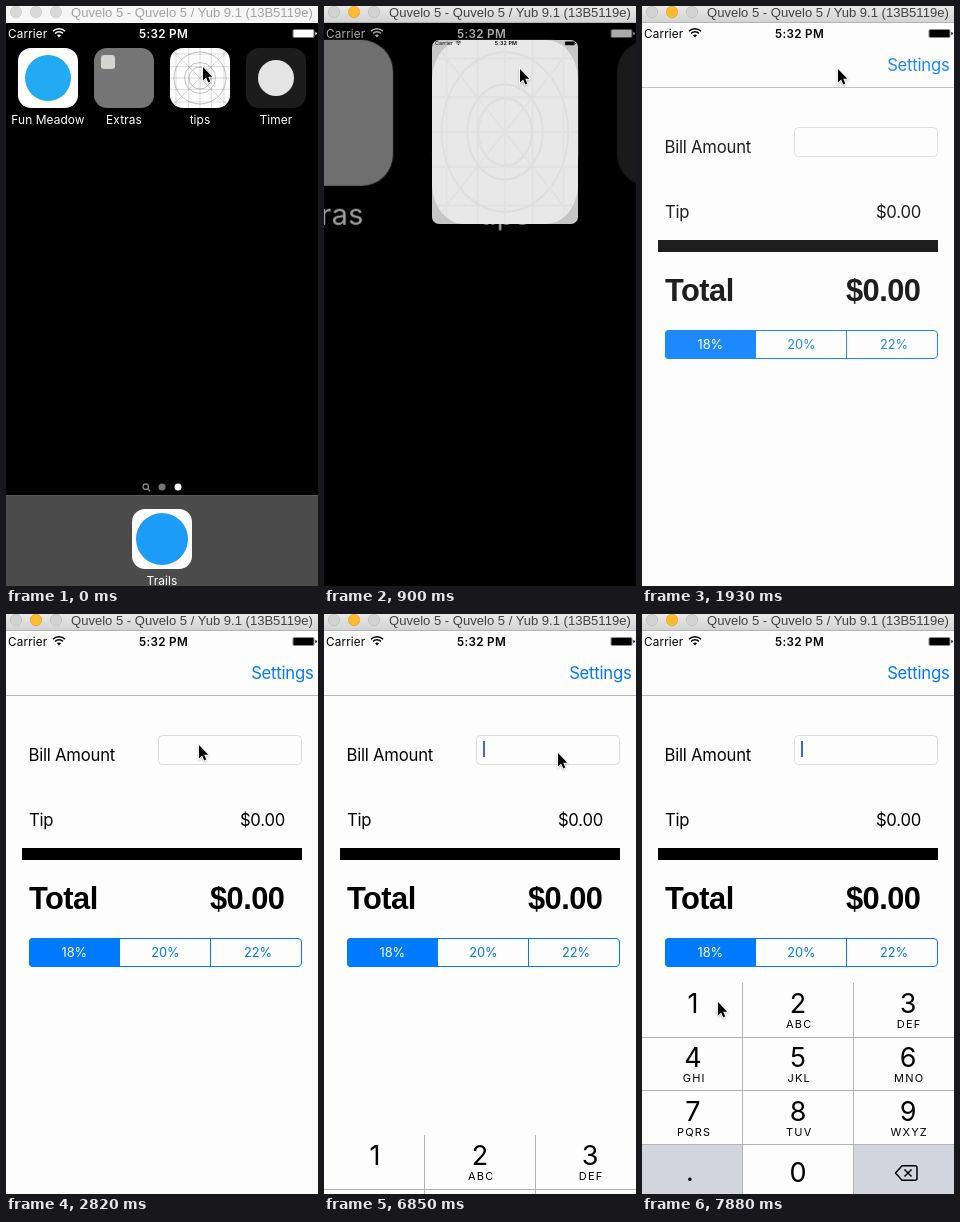
Recreate the animation shown at these times as an HTML page. Size 312 by 580 pixels, loop 8 s.

```html
<!DOCTYPE html>
<html lang="en">
<head>
<meta charset="utf-8">
<title>Tip calculator</title>
<style>
html, body { margin: 0; width: 100%; height: 100%; overflow: hidden; background: #000; }
svg { display: block; }
#stage { width: 312px; height: 580px; font-family: Inter, Roboto, sans-serif; }
.mid { text-anchor: middle; }
.end { text-anchor: end; }
.label { font-size: 11.9px; letter-spacing: .1px; fill: #fff; text-anchor: middle; }
.body { font-size: 16.7px; letter-spacing: -.23px; }
.big { font: bold 30.8px "Liberation Sans", Arial, sans-serif; letter-spacing: -.5px; }
.seg { font-size: 12.8px; letter-spacing: -.05px; text-anchor: middle; }
.digit { font-size: 27px; text-anchor: middle; }
.letters { font-size: 11px; letter-spacing: 1.2px; text-anchor: middle; }
.title { font: 13.05px "Liberation Sans", Arial, sans-serif; }

/* every change is a hard step on one 8 s clock */
.a { animation: 8s step-end infinite; }
#active { animation-name: active; }
#press { animation-name: press; }
#home { animation-name: home; }
#labels { animation-name: labels; }
#homeBar { animation-name: homeBar; }
#app { animation-name: app; }
#appBar { animation-name: appBar; }
#splash { animation-name: splash; }
#content { animation-name: content; }
#caret { animation-name: caret; }
#keys { animation-name: keys; }
#cursor { animation-name: cursor; }

@keyframes active { 0% { opacity: 0 } 7.5%, 100% { opacity: 1 } }
@keyframes press { 0% { opacity: 0 } 7.5%, 100% { opacity: .5 } }
@keyframes home {
  0% { transform: none; opacity: 1 }
  11.25% { transform: translate(-291px, -68.2px) scale(2.433); opacity: .96 }
  13.125%, 100% { transform: none; opacity: 0 }
}
@keyframes labels { 0% { opacity: 1 } 11.25%, 100% { opacity: .67 } }
@keyframes homeBar {
  0% { opacity: 1 } 11.25% { opacity: .67 } 13.125% { opacity: .13 } 15%, 100% { opacity: 0 }
}
@keyframes app {
  0% { opacity: 0; x: 108px; y: 34px; width: 146px; height: 184px; rx: 7px; fill: #c6c6c6 }
  11.25% { opacity: 1; x: 108px; y: 34px; width: 146px; height: 184px; rx: 7px; fill: #c6c6c6 }
  13.125% { opacity: 1; x: 11.5px; y: 19px; width: 296.5px; height: 505px; rx: 1px; fill: #fefefe }
  15%, 100% { opacity: 1; x: 0px; y: 17px; width: 312px; height: 563px; rx: 0px; fill: #fdfdfd }
}
@keyframes appBar {
  0% { opacity: 0; transform: none }
  11.25% { opacity: 1; transform: translate(110.2px, 32.6px) scale(.456) }
  13.125% { opacity: 1; transform: translate(15.2px, 19.2px) scale(.925) }
  15% { opacity: 1; transform: translate(4px, 17.3px) scale(.975) }
  16.75%, 100% { opacity: 1; transform: translate(0, 17px) }
}
@keyframes splash { 0% { opacity: 0 } 11.25% { opacity: 1 } 13.125%, 100% { opacity: 0 } }
@keyframes content { 0% { opacity: 0 } 24.125% { opacity: .88 } 25.875%, 100% { opacity: 1 } }
@keyframes caret {
  0% { opacity: 0 } 85.625% { opacity: 1 } 93% { opacity: .5 } 94.75% { opacity: 0 } 98.5%, 100% { opacity: 1 }
}
@keyframes keys {
  0% { transform: translateY(600px) }
  85.625% { transform: translateY(521px) }
  87.5% { transform: translateY(405px) }
  89.25% { transform: translateY(371px) }
  91.125%, 100% { transform: translateY(369px) }
}
@keyframes cursor {
  0% { transform: translate(196px, 60px) }
  1.875% { transform: translate(195px, 62px) }
  31.5% { transform: translate(194px, 72px) }
  33.375% { transform: translate(193px, 110px) }
  35.25% { transform: translate(192px, 130px) }
  37.125% { transform: translate(192px, 135px) }
  50.125% { transform: translate(204px, 136px) }
  52% { transform: translate(230px, 136px) }
  53.875% { transform: translate(233px, 138px) }
  93% { transform: translate(233px, 139px) }
  94.75%, 100% { transform: translate(75px, 387px) }
}
</style>
</head>
<body>
<svg id="stage" viewBox="0 0 312 580" xmlns="http://www.w3.org/2000/svg">
  <defs>
    <linearGradient id="chrome" x2="0" y2="1">
      <stop offset="0" stop-color="#e9e9e9"/><stop offset="1" stop-color="#d2d2d2"/>
    </linearGradient>
    <symbol id="status" viewBox="0 0 312 20" overflow="visible">
      <g fill="currentColor">
        <text x="2" y="14.5" font-size="11.7" letter-spacing=".15">Carrier</text>
        <text x="157.5" y="14.5" class="mid" font-size="11.7" font-weight="600" letter-spacing=".3">5:32 PM</text>
        <path d="M53 14.5l-2-2.2a3 3 0 0 1 4 0z"/>
        <g fill="none" stroke="currentColor" stroke-width="1.5">
          <path d="M49.1 10.4a5.6 5.6 0 0 1 7.8 0M47 8.1a8.6 8.6 0 0 1 12 0"/>
        </g>
        <rect x="286.5" y="6" width="22" height="9" rx="1.8" opacity=".45"/>
        <rect x="287.5" y="7" width="20" height="7" rx=".8"/>
        <path d="M309.300 8.900q1.500.2 1.500 1.600t-1.500 1.600z"/>
      </g>
    </symbol>
    <symbol id="grid" viewBox="0 0 60 60" preserveAspectRatio="none">
      <clipPath id="tile"><rect width="60" height="60" rx="13"/></clipPath>
      <g clip-path="url(#tile)">
        <rect width="60" height="60" fill="var(--paper)"/>
        <g fill="none" stroke="currentColor" stroke-width="var(--line)">
          <path opacity=".6" d="M0 6H60M0 18.7H60M0 30H60M0 41.3H60M0 54H60M6 0V60M18.7 0V60M30 0V60M41.3 0V60M54 0V60M0 0L60 60M60 0L0 60"/>
          <circle cx="30" cy="30" r="26"/><circle cx="30" cy="30" r="15.5"/><circle cx="30" cy="30" r="11"/>
        </g>
      </g>
    </symbol>
  </defs>

  <rect width="312" height="580"/>

  <g id="home" class="a">
    <rect x="12" y="42" width="60" height="60" rx="13" fill="#fff"/>
    <circle cx="42" cy="72" r="23" fill="#22aaf2"/>
    <rect x="88" y="42" width="60" height="60" rx="13" fill="#757575"/>
    <rect x="95" y="49" width="14" height="14" rx="3" fill="#d3d3d0"/>
    <use href="#grid" x="164" y="42" width="60" height="60" style="--paper:#fff;--line:.5px;color:#858585"/>
    <rect id="press" class="a" x="164" y="42" width="60" height="60" rx="13" opacity="0"/>
    <rect x="240" y="42" width="60" height="60" rx="13" fill="#1c1c1c"/>
    <circle cx="270" cy="72" r="18" fill="#e4e4e4"/>
    <g id="labels" class="a">
      <text class="label" x="42" y="118">Fun Meadow</text>
      <text class="label" x="118" y="118">Extras</text>
      <text class="label" x="194" y="118">tips</text>
      <text class="label" x="270" y="118">Timer</text>
    </g>
    <g fill="none" stroke="#858585" stroke-width="1.3">
      <circle cx="139.7" cy="480.7" r="2.7"/><path d="M141.7 482.7l2.5 2.5"/>
    </g>
    <circle cx="156" cy="481" r="3.5" fill="#777"/>
    <circle cx="172" cy="481" r="3.5" fill="#fff"/>
    <rect y="489" width="312" height="91" fill="#4b4b4b"/>
    <rect y="489" width="312" height="1" fill="#595959"/>
    <rect x="126" y="503" width="60" height="60" rx="13" fill="#fff"/>
    <circle cx="156" cy="533" r="26" fill="#1c9cf6"/>
    <text class="label" x="156" y="579">Trails</text>
  </g>
  <g id="homeBar" class="a" color="#fff"><use href="#status" y="17" width="312" height="20"/></g>

  <rect id="app" class="a" opacity="0"/>
  <g id="splash" class="a" opacity="0">
    <use href="#grid" x="108" y="34" width="146" height="184" style="--paper:#e8e8e8;--line:.8px;color:#dedede"/>
  </g>
  <g id="appBar" class="a" color="#000" opacity="0"><use href="#status" width="312" height="20"/></g>

  <g id="content" class="a" opacity="0">
    <rect y="81" width="312" height="1" fill="#b9b9b9"/>
    <text class="body end" x="307.6" y="65.400" fill="#007aff">Settings</text>
    <text class="body" x="22.5" y="147">Bill Amount</text>
    <rect x="152.5" y="121.5" width="143" height="29" rx="4" fill="#fdfdfd" stroke="#dcdcdc"/>
    <text class="body" x="23" y="212">Tip</text>
    <text class="body end" x="279" y="212">$0.00</text>
    <rect x="16" y="234" width="280" height="12"/>
    <text class="big" x="23" y="295">Total</text>
    <text class="big end" x="278.500" y="295">$0.00</text>
    <rect x="23.5" y="324.5" width="272" height="28" rx="3.500" fill="none" stroke="#007aff"/>
    <path d="M114 324H27a4 4 0 0 0-4 4V349a4 4 0 0 0 4 4H114z" fill="#007aff"/>
    <path d="M204.5 324V353" stroke="#007aff"/>
    <text class="seg" x="68.3" y="343" fill="#fff">18%</text>
    <text class="seg" x="159.3" y="343" fill="#007aff">20%</text>
    <text class="seg" x="252" y="343" fill="#007aff">22%</text>
  </g>
  <rect id="caret" class="a" x="159" y="127" width="2" height="16" fill="#3f68e6" opacity="0"/>

  <g id="keys" class="a" transform="translate(0 600)">
    <rect width="312" height="220" fill="#fdfdfd"/>
    <path d="M0 162H100V220H0zM212 162H312V220H212z" fill="#d2d5dc"/>
    <path d="M0 54.5H312M0 107.5H312M0 161.5H312M100.5 0V220M211.5 0V220" stroke="#b4b4b6" fill="none"/>
    <g id="pad"></g>
    <g fill="none" stroke="#000" stroke-width="1.5" stroke-linejoin="round">
      <path d="M253.5 190l6.5-7.2H273q2 0 2 2V195.2q0 2-2 2H260z"/>
      <path d="M262.5 186.5l7 7m0-7l-7 7"/>
    </g>
  </g>

  <rect width="312" height="17" fill="#f6f6f6"/>
  <g fill="#d9d9d9" stroke="#cdcdcd" stroke-width=".8">
    <circle cx="10" cy="6" r="5.7"/><circle cx="30" cy="6" r="5.7"/><circle cx="50" cy="6" r="5.7"/>
  </g>
  <text class="title" x="65" y="11" fill="#a2a2a2">Quvelo 5 - Quvelo 5 / Yub 9.1 (13B5119e)</text>
  <g id="active" class="a" opacity="0">
    <rect width="312" height="17" fill="url(#chrome)"/>
    <rect y="16" width="312" height="1" fill="#b4b4b4"/>
    <g fill="#d3d3d3" stroke="#bebebe" stroke-width=".8">
      <circle cx="10" cy="6" r="5.7"/><circle cx="50" cy="6" r="5.7"/>
      <circle cx="30" cy="6" r="5.7" fill="#fdbc2f" stroke="#e3a527"/>
    </g>
    <text class="title" x="65" y="11" fill="#424242">Quvelo 5 - Quvelo 5 / Yub 9.1 (13B5119e)</text>
  </g>

  <g id="cursor" class="a">
    <path d="M1 1V14.500l3.100-3 2.200 5 2-.9-2.100-4.800H10.300z" stroke="#fff" stroke-width="1.6" paint-order="stroke"
      style="filter:drop-shadow(0 1px .8px rgba(0,0,0,.25))"/>
  </g>
</svg>
<script>
const pad = document.getElementById('pad');
const columns = [51, 156, 266];
const rowHeight = 53.8;
const letters = ['', 'ABC', 'DEF', 'GHI', 'JKL', 'MNO', 'PQRS', 'TUV', 'WXYZ'];

function addText(cls, x, y, text) {
  const node = document.createElementNS('http://www.w3.org/2000/svg', 'text');
  node.setAttribute('class', cls);
  node.setAttribute('x', x);
  node.setAttribute('y', y);
  node.textContent = text;
  pad.append(node);
}

letters.forEach((group, i) => {
  const x = columns[i % 3];
  const y = Math.floor(i / 3) * rowHeight;
  addText('digit', x, y + 30, i + 1);
  addText('letters', x + 1.2, y + 45, group);
});
addText('digit', 48, 198, '.');
addText('digit', 156, 199, '0');
</script>
</body>
</html>
```
